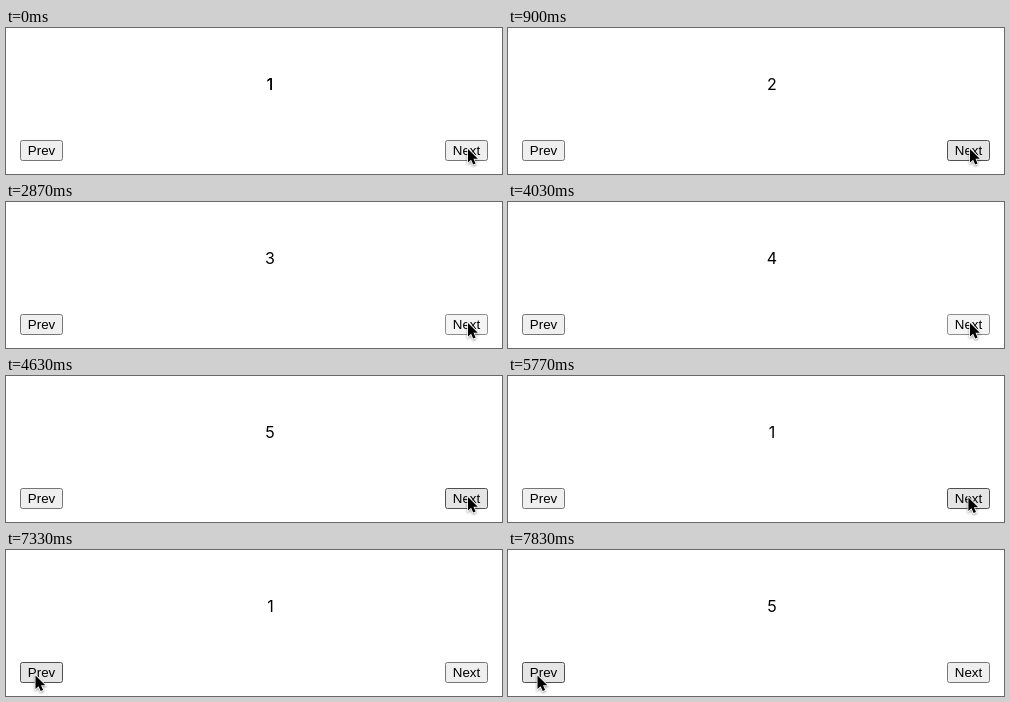
Recreate the animation shown at these times as an HTML page. Size 496 by 146 pixels, loop 8000 ms.

```html
<!DOCTYPE html>
<html lang="en">
<head>
<meta charset="utf-8">
<title>Carousel</title>
<style>
  html, body { margin: 0; width: 100%; height: 100%; overflow: hidden; background: #fff; }
  svg { display: block; }
  text { text-anchor: middle; }
  .slide { font: 16px Inter, sans-serif; }
  .button text { font: 13.333px "Liberation Sans", Arial, sans-serif; }
  .button rect { fill: #efefef; stroke: #767676; }
  .hover rect { fill: #e5e5e5; stroke: #4f4f4f; }
  .active rect { fill: #f5f5f5; stroke: #8d8d8d; }
  #cursor { filter: drop-shadow(0 1px 1px #0006); }
</style>
</head>
<body>
<svg width="496" height="146" viewBox="0 0 496 146">
  <clipPath id="view"><rect x="14" width="468" height="110"/></clipPath>
  <g clip-path="url(#view)">
    <text id="current" class="slide" y="62"/>
    <text id="incoming" class="slide" y="62"/>
  </g>
  <g id="prev" class="button">
    <rect x="14.5" y="112.5" width="42" height="20" rx="2"/>
    <text x="35.5" y="127">Prev</text>
  </g>
  <g id="next" class="button">
    <rect x="439.5" y="112.5" width="42" height="20" rx="2"/>
    <text x="460.5" y="127">Next</text>
  </g>
  <path id="cursor" d="M0 0V13.6L3.1 10.7L5.2 15.6L7.6 14.6L5.5 9.8H9.8Z"
        stroke="#fff" stroke-width="1.6" paint-order="stroke"/>
</svg>
<script>
const LOOP = 8000, SLIDES = 5, STEP = 500, CENTER = 264, DURATION = 500;
const $ = id => document.getElementById(id);

const clicks = [
  { down: 300, up: 400, dir: 1 },
  { down: 1570, up: 1700, dir: 1 },
  { down: 2870, up: 2970, dir: 1 },
  { down: 4030, up: 4130, dir: 1 },
  { down: 5130, up: 5230, dir: 1 },
  { down: 7200, up: 7330, dir: -1 },
];

// Pointer path: time, x, y
const path = [
  [5740, 462, 121], [5930, 412, 129], [6250, 226, 130.5], [6480, 116, 130.5],
  [6630, 76, 130], [6770, 44, 128], [6870, 29.5, 125.5],
];

// CSS "ease": cubic-bezier(.25, .1, .25, 1)
function ease(p) {
  if (p <= 0 || p >= 1) return p <= 0 ? 0 : 1;
  const bezier = (a, b, s) => 3 * a * s * (1 - s) ** 2 + 3 * b * s * s * (1 - s) + s ** 3;
  let low = 0, high = 1;
  for (let i = 0; i < 24; i++) {
    const mid = (low + high) / 2;
    if (bezier(.25, .25, mid) < p) low = mid; else high = mid;
  }
  return bezier(.1, 1, low);
}

// Cubic Hermite curve through the path points, at rest at both ends
function pointer(t) {
  const last = path.length - 1;
  if (t <= path[0][0]) return path[0].slice(1);
  if (t >= path[last][0]) return path[last].slice(1);
  const i = path.findIndex(point => point[0] > t) - 1;
  const slope = (k, axis) => k === 0 || k === last ? 0 :
    (path[k + 1][axis] - path[k - 1][axis]) / (path[k + 1][0] - path[k - 1][0]);
  const span = path[i + 1][0] - path[i][0], s = (t - path[i][0]) / span;
  return [1, 2].map(axis =>
    path[i][axis] + (path[i + 1][axis] - path[i][axis]) * s * s * (3 - 2 * s)
    + span * s * (1 - s) * (slope(i, axis) * (1 - s) - slope(i + 1, axis) * s));
}

function place(id, index, x) {
  $(id).textContent = (index + SLIDES) % SLIDES + 1;
  $(id).setAttribute("x", x);
}

function draw(t) {
  const done = clicks.filter(c => t >= c.up);
  const index = done.reduce((sum, c) => sum + c.dir, 0);
  const { up, dir } = done.at(-1) || { up: -DURATION, dir: 0 };
  const shift = STEP * ease((t - up) / DURATION);
  place("current", index - dir, CENTER - dir * shift);
  place("incoming", index, CENTER + dir * (STEP - shift));

  const [x, y] = pointer(t);
  $("cursor").setAttribute("transform", `translate(${x} ${y})`);

  const pressed = clicks.some(c => t >= c.down && t < c.up);
  const inRow = t >= clicks[0].down && y < 133;
  const setState = (id, over) =>
    $(id).setAttribute("class", "button" + (over ? pressed ? " active" : " hover" : ""));
  setState("prev", inRow && x < 57);
  setState("next", inRow && x > 439);
}

function frame() {
  draw(performance.now() % LOOP);
  requestAnimationFrame(frame);
}
frame();
</script>
</body>
</html>
```
